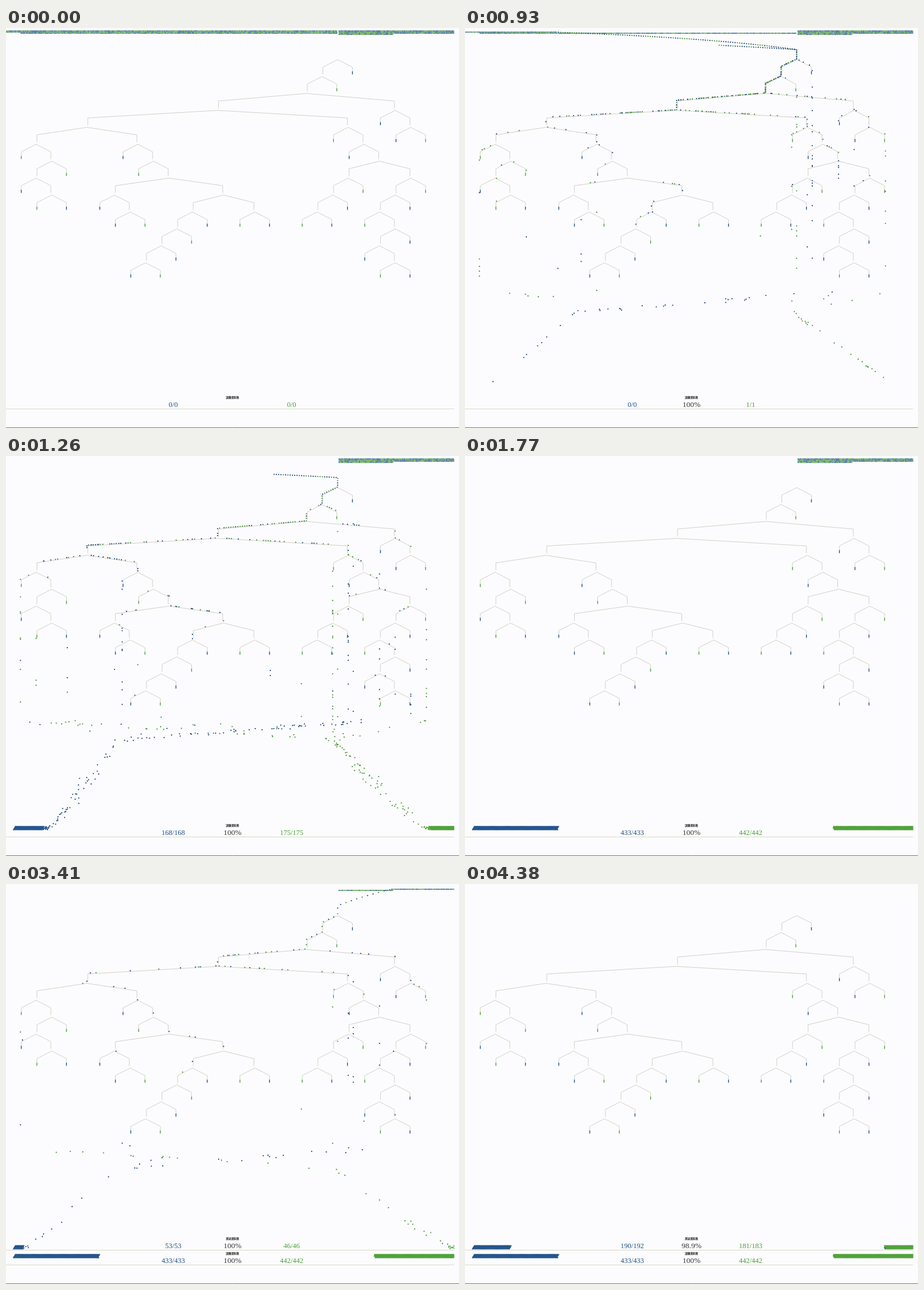
These frames come from a looping animation (797 by 703 pixels, 5890 ms). An HTML page with a canvas:

```html
<!DOCTYPE html>
<html lang="zh-Hant">
<head>
<meta charset="utf-8">
<style>
  html, body { margin: 0; width: 100%; height: 100%; overflow: hidden; background: #fcfcfe; }
  canvas { display: block; }
</style>
</head>
<body>
<canvas id="stage" width="797" height="703"></canvas>
<script>
const ctx = document.getElementById('stage').getContext('2d');
const LOOP = 5890, RIGHT = 788.5, LEVEL = 29.76;
const FALL = 0.92, SETTLE = 90; // relative cost of the fall, time to slide into the pile
const COLORS = { b: '#1d4f87', g: '#4a9e35' };
const FLYING = { b: '#1c427c', g: '#438f2f' };

let seed = 11;
function random() {
  seed = (seed * 16807) % 2147483647;
  return seed / 2147483647;
}
const jitter = (value, spread) => value + (random() * 2 - 1) * spread;

// A branch is [left, right, half span]; a leaf is its class and its weight.
const westArm = ['g8', [['b2', ['g1', 'b1']], 'g2']];
const deepArm = [[[['b1', 'g1'], 'b1'], 'g1'], 'b4'];
const midArm = ['b10', ['g3', [['b1', ['b1', 'g1']], [deepArm, ['g1', 'b1'], 53.3], 94.4]]];
const eastArm = [[['g1', [['b1', ['g1', 'b1']], 'b1']], 'b1'], 'g2'];
const innerArm = ['g16', ['b4', [[[['g1', 'b1'], 'b1'], 'g1'], eastArm, 53.5]]];
const main = [[westArm, midArm, 88], innerArm, 228.4];
const tree = [[[main, ['b9', ['b2', 'g6']], 154.7], 'g5'], 'b10'];

const lines = [], leaves = [];
function layout(node, x, y, path) {
  const span = node[2] || 26;
  [-1, 1].forEach((side, i) => {
    const child = node[i], stem = x + side * span, childX = stem + side * 1.5;
    const isLeaf = typeof child === 'string';
    const route = [...path, [x, y - 1], [childX, y + 12]];
    lines.push([x, y, stem, y + 13.3, isLeaf ? y + 20 : y + 26.3]);
    if (isLeaf) {
      leaves.push({ kind: child[0], weight: +child.slice(1), x: stem, y: y + 20.5, route });
    } else {
      layout(child, childX, y + LEVEL, route);
    }
  });
}
layout(tree, 583.5, 55.5, [[583.5, 38]]);

function pickLeaf(kind) {
  const group = leaves.filter(leaf => leaf.kind === kind);
  let pick = random() * group.reduce((sum, leaf) => sum + leaf.weight, 0);
  return group.find(leaf => (pick -= leaf.weight) < 0) || group[0];
}

function measure(points, fallFrom) {
  const marks = [0];
  for (let i = 1; i < points.length; i++) {
    const [x0, y0] = points[i - 1], [x1, y1] = points[i];
    marks.push(marks[i - 1] + Math.hypot(x1 - x0, y1 - y0) * (i > fallFrom ? FALL : 1));
  }
  return marks;
}

function makeSet({ blue, green, wrong, step, floor, home }) {
  const kinds = [...'b'.repeat(blue) + 'g'.repeat(green)];
  for (let i = kinds.length - 1; i > 0; i--) {
    const j = Math.floor(random() * (i + 1));
    [kinds[i], kinds[j]] = [kinds[j], kinds[i]];
  }
  const dots = kinds.map((kind, i) => {
    const { route } = pickLeaf(kind);
    const points = [home(i), ...route, [route[route.length - 1][0], jitter(465, 3)],
      [jitter(kind === 'b' ? 195 : 577, 4), jitter(500, 3)]];
    return { kind, look: kind, start: i * step, points, fallFrom: route.length };
  });
  for (const kind of 'bg') {
    const group = dots.filter(dot => dot.kind === kind), inward = kind === 'b' ? 1 : -1;
    const funnelTime = dot => dot.start + measure(dot.points, dot.fallFrom).pop();
    group.sort((a, b) => funnelTime(a) - funnelTime(b));
    group.forEach((dot, k) => {
      const column = Math.floor(k / 6), row = k % 6, offset = column * 2.08 + row * 0.7;
      const slot = [(kind === 'b' ? 13.3 : 802) + inward * offset, floor - row * 1.12];
      const landing = [slot[0] + inward * random() * 12, floor - random() * 6];
      const funnel = dot.points[dot.points.length - 1];
      const spread = 2 + Math.min(10, k / 10);
      const midway = [0, 1].map(axis => jitter((funnel[axis] + landing[axis]) / 2, spread));
      dot.points.push(midway, landing);
      dot.marks = measure(dot.points, dot.fallFrom);
      const length = dot.marks[dot.marks.length - 1];
      dot.arrival = dot.start + length;
      dot.points.push(slot);
      dot.marks.push(length + SETTLE);
      dot.wrong = k >= group.length - wrong;
      if (dot.wrong) dot.look = kind === 'b' ? 'g' : 'b';
    });
  }
  return dots;
}

const training = {
  label: '訓練資料集', base: 669.5,
  keys: [[130, 0], [400, 270], [670, 640], [930, 1057], [1260, 2260], [1770, 4150]],
  dots: makeSet({
    blue: 433, green: 442, wrong: 0, step: 2.08, floor: 656.8,
    home: i => [582 - (i % 296) * 1.97, 5.3 + Math.floor(i / 296) * 2]
  })
};
const testing = {
  label: '測試資料集', base: 643.5,
  keys: [[2860, 0], [3410, 2165], [4000, 3200], [4380, 4900]],
  dots: makeSet({
    blue: 192, green: 183, wrong: 2, step: 8.2, floor: 641.3,
    home: i => [586 + (i % 108) * 1.89, 5.3 + Math.floor(i / 108) * 2]
  })
};

function travelAt(keys, t) {
  if (t <= keys[0][0]) return 0;
  const i = keys.findIndex(key => key[0] > t);
  if (i < 0) return Infinity;
  const [t0, d0] = keys[i - 1], [t1, d1] = keys[i];
  return d0 + (d1 - d0) * (t - t0) / (t1 - t0);
}

function place(dot, travel) {
  const distance = travel - dot.start, { points, marks } = dot;
  if (distance <= 0) return points[0];
  const i = marks.findIndex(mark => mark > distance);
  if (i < 0) return points[points.length - 1];
  const f = (distance - marks[i - 1]) / (marks[i] - marks[i - 1]);
  return points[i].map((v, axis) => points[i - 1][axis] + (v - points[i - 1][axis]) * f);
}

function stroke(color, width, ...points) {
  ctx.strokeStyle = color;
  ctx.lineWidth = width;
  ctx.beginPath();
  points.forEach(([x, y]) => ctx.lineTo(x, y));
  ctx.stroke();
}

function text(value, x, y, font, color) {
  ctx.font = font;
  ctx.fillStyle = color;
  ctx.fillText(value, x, y);
}

function drawTree() {
  for (const [x, y, stem, bend, end] of lines) {
    stroke('#c8c3b8', 0.8, [x, y], [stem, bend], [stem, end]);
  }
  for (const { kind, x, y } of leaves) stroke(COLORS[kind], 1.4, [x, y], [x, y + 5.5]);
}

function drawScore({ label, base, dots }, travel, alpha) {
  const serif = '"Liberation Serif", "Times New Roman", serif';
  const score = kind => {
    const done = dots.filter(dot => dot.kind === kind && dot.arrival <= travel);
    return [done.filter(dot => !dot.wrong).length, done.length];
  };
  const blue = score('b'), green = score('g'), total = blue[1] + green[1];
  ctx.globalAlpha = alpha;
  stroke('#d9d6c3', 1, [0, base], [RIGHT, base]);
  text(label, 398.5, base - 19, 'bold 4.7px "Noto Sans CJK TC", "Noto Sans CJK", sans-serif', '#111');
  text(blue.join('/'), 294.3, base - 4, '12.5px ' + serif, COLORS.b);
  text(green.join('/'), 502.5, base - 4, '12.5px ' + serif, COLORS.g);
  if (total) {
    const percent = 100 * (blue[0] + green[0]) / total;
    text((percent === 100 ? 100 : percent.toFixed(1)) + '%', 398.5, base - 4, '13.5px ' + serif, '#333');
  }
  ctx.globalAlpha = 1;
}

function drawDots(dots, travel) {
  for (const dot of dots) {
    const [x, y] = place(dot, travel);
    const flying = travel > dot.start && travel < dot.arrival;
    ctx.fillStyle = (flying ? FLYING : COLORS)[dot.look];
    ctx.beginPath();
    ctx.arc(x, y, travel <= dot.start ? 0.95 : 1.1, 0, 7);
    ctx.fill();
  }
}

function draw(t) {
  ctx.fillStyle = '#fcfcfe';
  ctx.fillRect(0, 0, 797, 703);
  stroke('#77716a', 1, [0, 702.5], [797, 702.5]);
  ctx.save();
  ctx.beginPath();
  ctx.rect(0, 0, RIGHT, 703);
  ctx.clip();
  ctx.textAlign = 'center';
  drawTree();
  for (const set of [training, testing]) {
    const travel = travelAt(set.keys, t);
    const alpha = set === training ? 1 : t < 2860 ? 0 : Math.min(1, 0.2 + (t - 2860) / 250);
    drawScore(set, travel, alpha);
    drawDots(set.dots, travel);
  }
  ctx.restore();
}

const begin = performance.now();
function tick() {
  draw((performance.now() - begin) % LOOP);
  requestAnimationFrame(tick);
}
tick();
</script>
</body>
</html>
```
